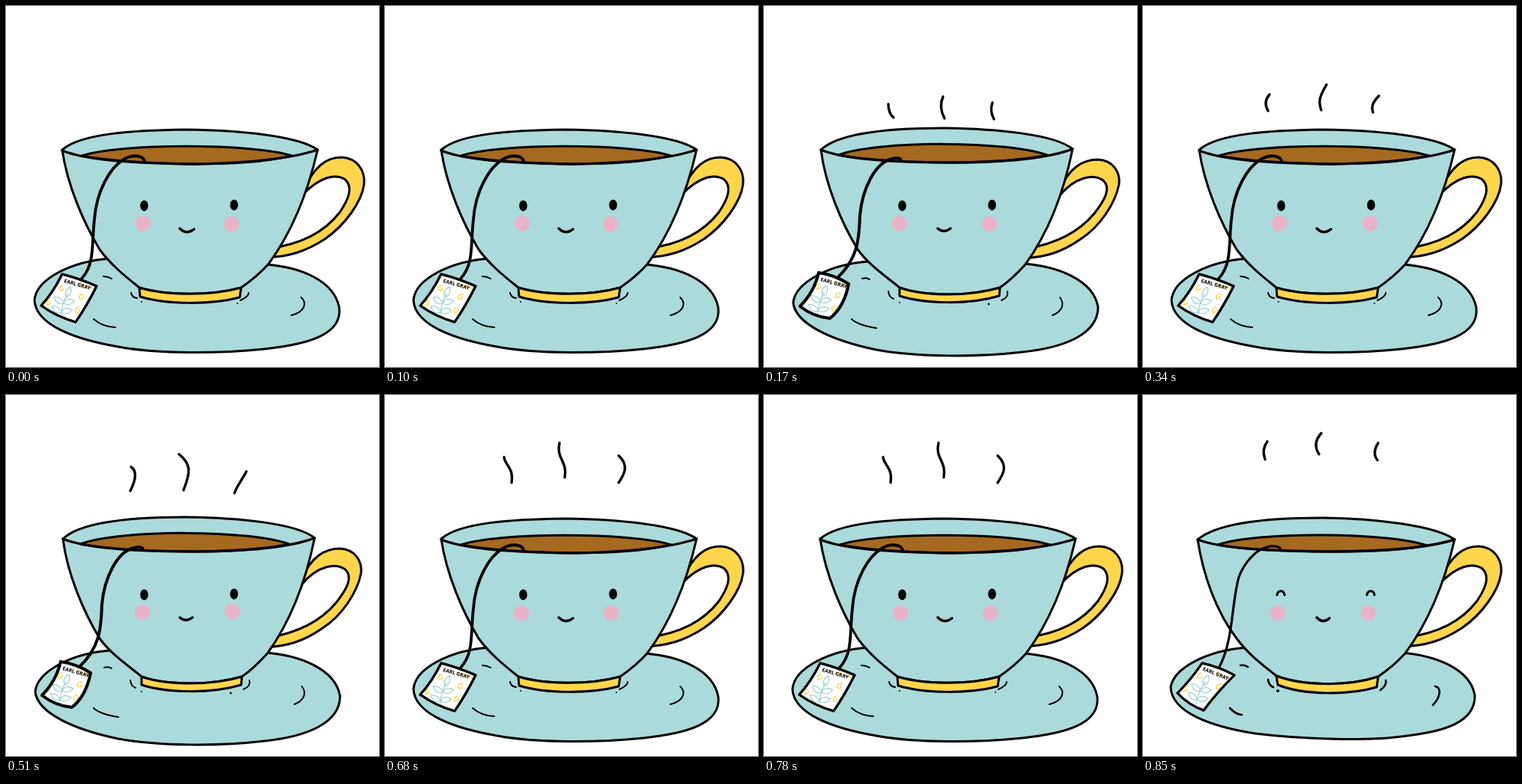
Animation, 498 px wide and 482 px high, one loop 1020 ms. Source, as an HTML page:

```html
<!DOCTYPE html>
<html lang="en">
<meta charset="utf-8">
<title>Cup of tea</title>
<style>
  html, body { margin: 0; width: 100%; height: 100%; overflow: hidden; background: #fff; }
  svg { display: block; fill: none; stroke: #000; stroke-width: 3; stroke-linecap: round; stroke-linejoin: round; }
  .teal { fill: #abdada; }
  .gold { fill: #ffd54a; }
  .tea { fill: #a66920; }
  .tag { fill: #fff; }
  .dot { fill: #000; stroke: none; }
  .blush { fill: #e9b2c7; stroke: none; }
  .bold { stroke-width: 3.4; }
  .leaf { stroke: #9fd3d4; stroke-width: 1.3; }
  .swirl { stroke: #ffd54a; stroke-width: 1.5; }
  .label { font: bold 6.8px "Noto Sans", sans-serif; fill: #000; stroke: none; }
</style>
<svg id="stage" width="498" height="482" viewBox="0 0 498 482"></svg>
<script>
const STEP = 170;
const stage = document.getElementById('stage');

const path = (cls, d, width) => `<path class="${cls}" d="${d}"${width ? ` style="stroke-width:${width}"` : ''}/>`;
const oval = (cls, x, y, rx, ry = rx) => `<ellipse class="${cls}" cx="${x}" cy="${y}" rx="${rx}" ry="${ry}"/>`;

const wideHandle = 'M398 244C412 214 428 202 448 202C469 203 480 220 478 238C475 262 452 293 426 311C400 328 377 335 345 336L350 324C395 318 425 302 446 275C458 257 464 241 452 231C440 224 420 227 396 252Z';
const openEyes = oval('dot', 184.5, 266.7, 5.3, 7.3) + oval('dot', 304.5, 265.7, 5.3, 7.3);

const poses = [
  {
    saucer: 'M38 393C40 365 86 341 140 337L345 345C392 348 438 366 445 403C449 440 400 452 345 458C285 464 205 465 150 455C92 445 40 426 38 393Z',
    handle: wideHandle,
    body: 'M75 192C100 170 170 166 240 165C310 166 390 173 416 192C405 240 385 298 350 345C340 356 327 367 314 376C275 387 215 387 178 376C162 363 141 347 125 325C104 290 82 240 75 192Z',
    tea: 'M101 200C150 183 330 183 382 200C340 209 300 211 250 211C190 210 140 207 101 200Z',
    rim: 'M75 193C105 205 160 210 250 211C320 210 380 204 416 192',
    band: 'M178 376C215 387 275 387 314 376L312 389C275 399 215 399 179 388Z',
    marks: 'M167 383Q168 389 175 390M324 383Q324 388 313 393M394 389C402 396 400 408 381 413M117 418Q128 428 146 429M130 361Q136 361 141 364', marksWidth: 2,
    dots: [[181, 395, 1], [309, 397, 1]],
    eyes: openEyes, smile: 'M232 297Q241 306 251 298',
    string: 'M101 364C119 344 114 320 118 285C121 245 140 215 157 205C170 197 185 200 185 208', stringWidth: 3.8,
    tag: 'M75 358Q98 364 121 374Q108 400 93 422Q68 415 47 400Q62 384 75 358Z', tagWidth: 3, artMove: ''
  },
  {
    saucer: 'M39 396C42 369 88 344 142 341L345 344C392 347 440 366 446 402C446 438 402 456 345 462C285 469 205 469 150 459C92 447 42 425 39 396Z',
    handle: 'M394 246C408 216 425 205 446 205C466 206 476 222 474 238C469 264 448 295 423 311C399 328 376 336 344 337L350 324C393 317 421 301 441 277C455 259 464 243 453 233C440 224 416 227 394 254Z',
    body: 'M76 192C100 169 170 163 240 163C310 164 388 171 412 191C402 240 383 298 349 345C340 355 328 367 315 376C275 388 215 388 181 376C163 361 141 347 125 325C104 290 82 240 76 192Z',
    tea: 'M99 199C150 179 330 180 378 199C340 207 300 209 250 209C190 209 140 206 99 199Z',
    rim: 'M76 192C105 204 160 209 250 209C320 209 380 203 412 191',
    band: 'M181 376C215 388 275 388 315 376L314 387C275 399 215 398 181 387Z',
    marks: 'M166 381Q167 389 173 391M325 381Q327 389 317 393M395 389C402 398 398 408 385 413M117 418Q125 426 150 430M131 364Q137 362 141 365', marksWidth: 2,
    dots: [[181, 396, 1], [300, 398, 1.4]],
    eyes: openEyes, smile: 'M232 297Q240 304 249 297',
    string: 'M98 363C125 337 127 313 128 280C131 245 148 209 171 204C177 202 183 203 183 207', stringWidth: 4,
    tag: 'M73 356Q94 359 113 371Q107 402 88 417Q66 415 48 401Q67 382 73 356Z', tagWidth: 4, artMove: 'translate(-2 -2)'
  },
  {
    saucer: 'M37 390C41 365 84 341 140 337L345 344C392 348 437 366 443 401C444 438 400 450 345 456C300 462 215 460 150 452C92 443 38 424 37 390Z',
    handle: wideHandle,
    body: 'M73 193C100 170 170 164 240 164C310 165 390 174 416 193C405 240 385 298 350 345C340 356 327 367 314 376C275 389 215 389 178 375C162 362 141 347 125 325C98 290 80 240 73 193Z',
    tea: 'M100 200C150 182 330 183 379 201C340 208 300 209 250 209C190 209 140 207 100 200Z',
    rim: 'M73 193C105 205 160 208 250 209C320 209 380 204 416 193',
    band: 'M178 375C215 389 275 389 314 376L312 390C275 401 215 401 180 387Z',
    marks: 'M167 380Q168 388 174 390M324 381Q326 387 317 394M390 389C400 391 396 405 387 414M116 418Q123 426 132 427M130 361Q136 360 140 363', marksWidth: 2.7,
    dots: [[180, 395, 2]],
    eyes: path('', 'M179 267C180 260 188 260 189 267M299 267C300 260 308 260 309 267'), smile: 'M232 297Q240 306 249 298',
    string: 'M102 363C121 327 118 278 128 243C135 224 151 206 166 203C175 200 184 203 184 207', stringWidth: 3.2,
    tag: 'M79 358Q102 363 122 374Q98 398 81 421Q61 414 46 398Q64 380 79 358Z', tagWidth: 3, artMove: 'rotate(6 84 390) translate(0 -1)'
  }
];

const leaf = (x, y, turn) => `<path class="leaf" d="M0 0Q6 -8 15 0Q7 6 0 0Z" transform="translate(${x} ${y}) rotate(${turn})"/>`;
const leafPair = (x, y) => leaf(x, y, -12) + leaf(x, y, -146);
const tagArt =
  path('swirl', 'M96 370L119 378M76 373q-6 1 -4 6q4 2 5 -2M104 385q-8 0 -6 6q5 2 5 -3M58 393q-5 1 -3 6q4 0 4 -3M97 402q-6 1 -4 7q5 1 5 -4') +
  path('leaf', 'M73 417Q74 399 82 384') +
  leafPair(74, 409) + leafPair(77, 397) + leaf(81, 389, -70) +
  '<text class="label" transform="translate(77 369) rotate(16)">EARL GRAY</text>';

const drawCrockery = p =>
  path('teal', p.saucer) + path('', p.marks, p.marksWidth) +
  p.dots.map(([x, y, r]) => oval('dot', x, y, r)).join('') +
  path('gold', p.handle) + path('teal', p.body) + path('tea', p.tea) +
  path('bold', p.rim) + path('gold', p.band);

const drawFace = (p, [lx, ly, rx, ry]) =>
  oval('blush', lx, ly, 10.3) + oval('blush', rx, ry, 10.3) + p.eyes + path('bold', p.smile);

const drawTag = p =>
  path('', p.string, p.stringWidth) + path('tag', p.tag) +
  `<clipPath id="tagClip"><path d="${p.tag}"/></clipPath>` +
  `<g clip-path="url(#tagClip)"><g transform="${p.artMove}">${tagArt}</g></g>` +
  path('', p.tag, p.tagWidth);

const beats = [
  { pose: 0, cheeks: [183, 290, 301, 291], steam: '' },
  { pose: 1, cheeks: [181, 290, 301, 291], steam: 'M166 131Q166 143 173 149M239 121Q233 135 241 150M305 129Q301 140 307 151' },
  { pose: 0, cheeks: [182, 290, 303, 290], steam: 'M169 118Q160 128 167 140M245 105C235 122 234 128 238 139M315 120C305 130 305 136 307 142' },
  { pose: 1, cheeks: [182, 290, 302, 289], steam: 'M167 96C176 102 172 116 166 128M231 79C247 92 247 102 237 127M321 102C316 112 309 120 305 131' },
  { pose: 0, cheeks: [182, 291, 302, 291], steam: 'M159 83C160 94 172 96 169 117M233 64C228 85 244 88 240 110M312 81C326 94 320 105 312 117' },
  { pose: 2, cheeks: [180, 291, 301, 291], steam: 'M166 62C160 70 160 78 163 86M238 51C230 60 229 70 235 79M314 64C307 75 309 82 313 87' }
];

const scenes = beats.map(({ pose, cheeks, steam }) => {
  const p = poses[pose];
  return drawCrockery(p) + drawFace(p, cheeks) + drawTag(p) + path('bold', steam);
});

let shown = -1;
function tick() {
  const beat = Math.floor(performance.now() / STEP) % beats.length;
  if (beat !== shown) stage.innerHTML = scenes[shown = beat];
  requestAnimationFrame(tick);
}
tick();
</script>
</html>
```
